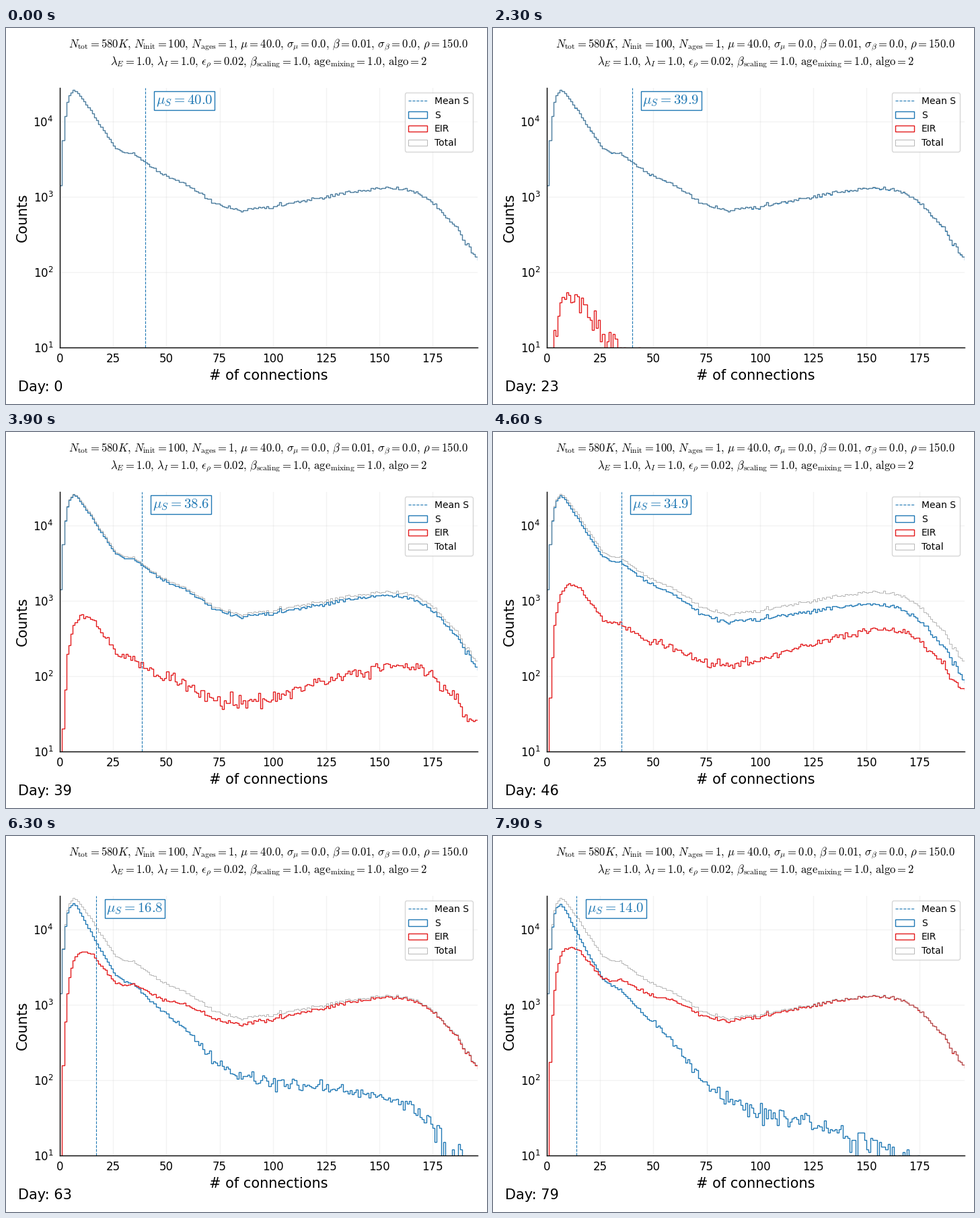
A matplotlib script for the animation above (8000 ms loop, 715 px wide and 559 px high).

```python
import numpy as np
import matplotlib.pyplot as plt
from matplotlib.animation import FuncAnimation
from matplotlib.lines import Line2D
from matplotlib.patches import Patch
from matplotlib.ticker import NullLocator

W, H, DPI = 715, 559, 100
DAYS = 80
BLUE, RED, GREY = "#1f78b4", "#e31a1c", "#808080"

plt.rcParams.update({"font.family": "DejaVu Sans", "mathtext.fontset": "cm"})
rng = np.random.default_rng(7)
k = np.arange(197)

# Key points of the contact distribution: degree, log10 of count
SHAPE = [(0, 3.15), (1, 3.75), (2, 4.07), (3, 4.26), (4, 4.35), (6, 4.42),
         (8, 4.38), (14, 4.15), (20, 3.89), (25, 3.68), (29, 3.60),
         (34, 3.58), (47, 3.31), (60, 3.15), (74, 2.89), (85, 2.82),
         (105, 2.90), (130, 3.04), (153, 3.13), (165, 3.09), (174, 2.95),
         (186, 2.58), (196, 2.13)]
# Key points of the final infection hazard by degree
HAZARD = [(0, 0), (6, .19), (15, .53), (30, .78), (50, 1.22), (80, 2.4),
          (195, 5.8)]


def through(points):
    return np.interp(k, *zip(*points))


def logistic(day, middle, rate):
    return 1 / (1 + np.exp(-rate * (day - middle)))


expected = 10 ** through(SHAPE)
total = np.round(expected + np.sqrt(expected) * rng.normal(size=k.size))
noise = rng.normal(size=(2, k.size))
final_hazard = through(HAZARD)
lag = 1 - np.exp(-(k / 45) ** 1.5)


def infected(day):
    """Cumulative infections per degree, with slowly drifting noise."""
    q = 1 - np.exp(-final_hazard * logistic(day, 52 + 7 * lag, .165 + .02 * lag))
    z = noise[0] * np.cos(day / 15) + noise[1] * np.sin(day / 15)
    n = total * q + np.sqrt(total * q * (1 - q)) * z
    return np.clip(np.round(n), 0, total)


def mean_degree(day):
    return 40 - 26.15 * logistic(day, 52.99, .2042)


def log_safe(n):
    return np.maximum(n, .1)


fig = plt.figure(figsize=(W / DPI, H / DPI), dpi=DPI, facecolor="white")
ax = fig.add_axes([80.2 / W, 84.5 / H, 620.4 / W, 385.4 / H])
ax.set_yscale("log")
ax.set_xlim(0, 196)
ax.set_ylim(10, 28000)
ax.set_xticks(range(0, 176, 25))
ax.yaxis.set_minor_locator(NullLocator())
ax.tick_params(length=0, pad=7, labelsize=12)
ax.tick_params(axis="x", pad=6.1)
ax.grid(color="#b0b0b0", alpha=.15, lw=1)
ax.set_axisbelow(True)
ax.spines[["top", "right"]].set_visible(False)
ax.spines[["left", "bottom"]].set_linewidth(1)
ax.set_xlabel("# of connections", fontsize=15)
ax.set_ylabel("Counts", fontsize=15)


def outline(n, color, **kw):
    return ax.stairs(log_safe(n), np.arange(198), baseline=None, color=color, **kw)


s_steps = outline(total, BLUE, lw=1, zorder=2)
eir_steps = outline(0 * total, RED, lw=1, zorder=2.1)
outline(total, GREY, lw=.5, alpha=.8, zorder=2.2)
mean_line = ax.axvline(40, color=BLUE, ls="--", lw=.8, zorder=2.3)
mean_text = ax.text(0, .98, "", transform=ax.get_xaxis_transform(),
                    fontsize=15, color=BLUE, va="top", zorder=4,
                    bbox=dict(facecolor="white", edgecolor=BLUE, pad=2, lw=1))


def box(color, label, **kw):
    return Patch(fill=False, edgecolor=color, label=label, **kw)


ax.legend(handles=[Line2D([], [], color=BLUE, ls="--", lw=.8, label="Mean S"),
                   box(BLUE, "S", lw=1), box(RED, "EIR", lw=1),
                   box(GREY, "Total", lw=.5, alpha=.8)],
          loc="upper right", fontsize=10).set_zorder(5)


def equations(pairs):
    return "$" + r", \, ".join(f"{name} = {value}" for name, value in pairs) + "$"


def sub(name, index):
    return rf"{name}_{{\mathrm{{{index}}}}}"


line1 = equations([
    (sub("N", "tot"), "580K"), (sub("N", "init"), "100"),
    (sub("N", "ages"), "1"), (r"\mu", "40.0"), (r"\sigma_\mu", "0.0"),
    (r"\beta", "0.01"), (r"\sigma_\beta", "0.0"), (r"\rho", "150.0")])
line2 = equations([
    (r"\lambda_E", "1.0"), (r"\lambda_I", "1.0"), (r"\epsilon_\rho", "0.02"),
    (sub(r"\beta", "scaling"), "1.0"),
    (sub(r"\mathrm{age}", "mixing"), "1.0"), (r"\mathrm{algo}", "2")])
for text, y in ((line1, 30), (line2, 55)):
    fig.text(390.3 / W, 1 - y / H, text, fontsize=12, ha="center", va="baseline")
day_text = fig.text(.025, 1 - 540 / H, "", fontsize=15, va="baseline")


def update(day):
    eir = infected(day)
    s_steps.set_data(log_safe(total - eir))
    eir_steps.set_data(log_safe(eir))
    mean = mean_degree(day)
    mean_line.set_xdata([mean, mean])
    mean_text.set_x(mean + 5)
    mean_text.set_text(rf"$\mu_S = {mean:.1f}$")
    day_text.set_text(f"Day: {day}")
    return s_steps, eir_steps, mean_line, mean_text, day_text


anim = FuncAnimation(fig, update, frames=DAYS, interval=100,
                     repeat=True, repeat_delay=0)
plt.show()
```
